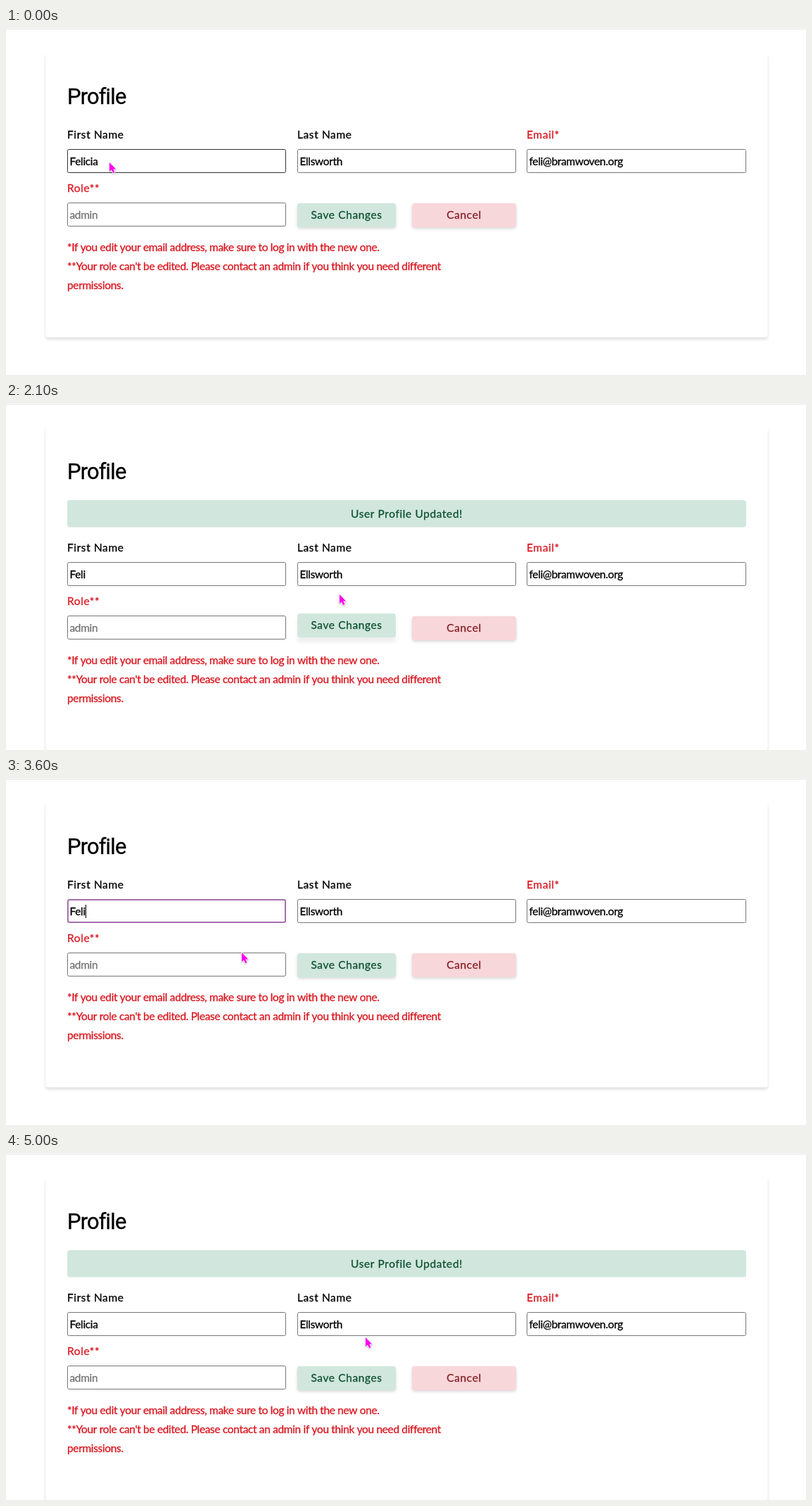
These frames come from a looping animation (1137x493 px, 6000 ms). An HTML page with a canvas:

```html
<!DOCTYPE html>
<html lang="en">
<head>
<meta charset="utf-8">
<title>Profile form</title>
<style>
  html, body { margin: 0; width: 100%; height: 100%; overflow: hidden; background: #fff; }
  canvas { display: block; }
</style>
</head>
<body>
<canvas id="stage" width="1137" height="493"></canvas>
<script>
const ctx = document.getElementById('stage').getContext('2d');
const LOOP = 6000, STEP = 100;

const COLORS = {
  red: '#d9161f', green: '#0f5132', greenBg: '#d1e7dd',
  pink: '#842029', pinkBg: '#f8d7da', border: '#767676',
  hover: '#333', focus: '#a66fad', muted: '#757575', pointer: '#ff00f0'
};
const BODY = '15.5px Lato, "Open Sans", sans-serif';
const HEADING = '31px Roboto, sans-serif';
const WIDE = 0.6, TIGHT = -0.35;

// Three equal columns, snapped to whole pixels.
const COLUMN = 311.3, PITCH = 326.7;
const columnX = i => Math.round(87 + PITCH * i);
const columnWidth = i => Math.round(87 + PITCH * i + COLUMN) - columnX(i);

// Each track lists [time, value...]; discrete tracks hold, motion tracks interpolate.
const tracks = {
  name: [[0, 'Felicia'], [600, 'Felici'], [800, 'Feli'],
         [4000, 'Felic'], [4100, 'Felici'], [4200, 'Felicia']],
  field: [[0, 'hover'], [200, 'focus'], [2000, 'border'], [2900, 'hover'],
          [3600, 'focus'], [4600, 'border']],
  caret: [[0, false], [200, true], [900, false], [1100, true], [1600, false],
          [3600, true], [3800, false], [4000, true], [4500, false]],
  updated: [[0, false], [2100, true], [3600, false], [4700, true]],
  waiting: [[0, false], [2000, true], [2100, false], [4600, true], [4700, false]],
  pointer: [[0, 'arrow'], [100, 'beam'], [800, ''], [1400, 'beam'], [1500, 'arrow'],
            [1800, 'hand'], [2100, 'arrow'], [2900, 'beam'], [3600, 'arrow'],
            [4000, ''], [4200, 'arrow'], [4400, 'hand'], [4700, 'arrow']]
};
const pointerPath = [
  [0, 147, 191], [300, 166, 200], [1300, 166, 200], [1400, 172, 203],
  [1600, 310, 322], [1800, 474, 272], [2600, 474, 272], [3000, 335, 246],
  [3500, 335, 246], [3600, 335, 248], [4100, 335, 248], [4200, 425, 238],
  [4300, 588, 238], [4400, 530, 258], [4500, 511, 262], [6000, 511, 262]
];
const liftPath = [
  [0, 0], [1700, 0], [1900, 4], [2100, 4], [2300, 0],
  [4300, 0], [4500, 4], [4600, 4], [4800, 0], [6000, 0]
];

const hold = (track, t) => track.findLast(key => key[0] <= t)[1];

function tween(path, t) {
  const i = Math.max(1, path.findIndex(key => key[0] >= t));
  const [a, b] = [path[i - 1], path[i]];
  const k = (t - a[0]) / (b[0] - a[0]);
  return a.slice(1).map((v, n) => v + (b[n + 1] - v) * k);
}

// The hairline stroke gives the slightly sturdy text weight.
function text(str, x, y, color, { spacing = WIDE, font = BODY, align = 'left' } = {}) {
  ctx.font = font;
  ctx.letterSpacing = spacing + 'px';
  ctx.textAlign = align;
  ctx.fillStyle = ctx.strokeStyle = color;
  ctx.lineWidth = 0.3;
  ctx.fillText(str, x, y);
  ctx.strokeText(str, x, y);
}

function box(x, y, w, h, fill, shadow) {
  ctx.save();
  if (shadow) {
    [ctx.shadowOffsetY, ctx.shadowBlur] = shadow;
    ctx.shadowColor = `rgba(0,0,0,${shadow[2]})`;
  }
  ctx.fillStyle = fill;
  ctx.beginPath();
  ctx.roundRect(x, y, w, h, 4);
  ctx.fill();
  ctx.restore();
}

function input(column, y, value, { state = 'border', color = '#000', caret = false } = {}) {
  const x = columnX(column), w = columnWidth(column);
  const focused = state === 'focus';
  const inset = focused ? 1 : 0.5;
  ctx.strokeStyle = COLORS[state];
  ctx.lineWidth = focused ? 2 : 1;
  ctx.beginPath();
  ctx.roundRect(x + inset, y + inset, w - 2 * inset, 34 - 2 * inset, 2);
  ctx.stroke();
  text(value, x + 3.5, y + 23, color, { spacing: TIGHT });
  if (caret) {
    ctx.fillStyle = '#000';
    ctx.fillRect(Math.round(x + 4 + ctx.measureText(value).width), y + 8, 1, 19);
  }
}

function button(x, y, w, label, color, fill, lift = 0) {
  const k = lift / 4;
  box(x, y - lift, w, 34, fill, [2 + 5 * k, 4 + 2 * k, 0.16 - 0.09 * k]);
  text(label, x + w / 2, y + 22 - lift, color, { align: 'center' });
}

const shapes = {
  arrow: new Path2D('M0 0V13L3 10.4L5.2 15.2L7.6 14.1L5.4 9.4H9.3Z'),
  hand: new Path2D('M1 1Q2-.5 3 1L3.6 5Q5 4 5.8 5.3Q7.2 4.5 8 5.8Q9.7 5.3 9.8 7L9.5 11L8 14H1.8L-2 9.5Q-2.4 7.5 0 8.3L1.4 9Z')
};

function drawPointer(kind, x, y) {
  if (!kind) return;
  ctx.save();
  ctx.translate(x, y);
  ctx.lineJoin = 'round';
  if (kind === 'beam') {
    ctx.strokeStyle = '#c018b8';
    ctx.lineWidth = 1.2;
    ctx.stroke(new Path2D('M-3.5-7.5Q0-7.5 0-5Q0-7.5 3.5-7.5M0-6V6M-3.5 7.5Q0 7.5 0 5Q0 7.5 3.5 7.5M-2 2.5H2'));
  } else {
    ctx.strokeStyle = '#fff';
    ctx.lineWidth = 1.5;
    ctx.shadowColor = 'rgba(0,0,0,.3)';
    ctx.shadowBlur = 2;
    ctx.shadowOffsetY = 1;
    ctx.stroke(shapes[kind]);
    ctx.shadowColor = 'transparent';
    ctx.fillStyle = COLORS.pointer;
    ctx.fill(shapes[kind]);
    if (kind === 'hand') {
      ctx.strokeStyle = '#8a1683';
      ctx.lineWidth = 0.6;
      ctx.stroke(shapes.hand);
      ctx.strokeStyle = '#fff';
      ctx.stroke(new Path2D('M3.5 9V12M5.5 9V12M7.5 9V12'));
    }
  }
  ctx.restore();
}

function draw(t) {
  const s = Object.fromEntries(Object.entries(tracks).map(([key, track]) => [key, hold(track, t)]));
  const [lift] = tween(liftPath, t);
  const shift = s.updated ? 54 : 0;

  ctx.fillStyle = '#fff';
  ctx.fillRect(0, 0, 1137, 493);
  ctx.fillStyle = '#e4e4e4';
  ctx.fillRect(0, 1, 1137, 1);
  box(56.5, 35, 1026, 404.5 + shift, '#fff', [3, 4, 0.13]);
  text('Profile', 87, 108, '#000', { font: HEADING, spacing: -0.9 });

  if (s.updated) {
    box(87, 138, 965, 38.5, COLORS.greenBg);
    text('User Profile Updated!', 569.5, 163, COLORS.green, { align: 'center' });
  }

  ctx.save();
  ctx.translate(0, shift);
  text('First Name', columnX(0), 157, '#000');
  text('Last Name', columnX(1), 157, '#000');
  text('Email*', columnX(2), 157, COLORS.red);
  input(0, 172, s.name, { state: s.field, caret: s.caret });
  input(1, 172, 'Ellsworth');
  input(2, 172, 'feli@bramwoven.org');
  text('Role**', columnX(0), 233, COLORS.red);
  input(0, 248, 'admin', { color: COLORS.muted });
  button(414, 249, 140, s.waiting ? 'Please Wait...' : 'Save Changes', COLORS.green, COLORS.greenBg, lift);
  button(577, 249, 148, 'Cancel', COLORS.pink, COLORS.pinkBg);
  [
    '*If you edit your email address, make sure to log in with the new one.',
    "**Your role can't be edited. Please contact an admin if you think you need different",
    'permissions.'
  ].forEach((line, i) => text(line, 87, 316.5 + 27 * i, COLORS.red, { spacing: TIGHT }));
  ctx.restore();

  drawPointer(s.pointer, ...tween(pointerPath, t));
}

const start = performance.now();
function frame() {
  const t = (performance.now() - start) % LOOP;
  draw(Math.floor(t / STEP) * STEP);
  requestAnimationFrame(frame);
}
frame();
</script>
</body>
</html>
```
